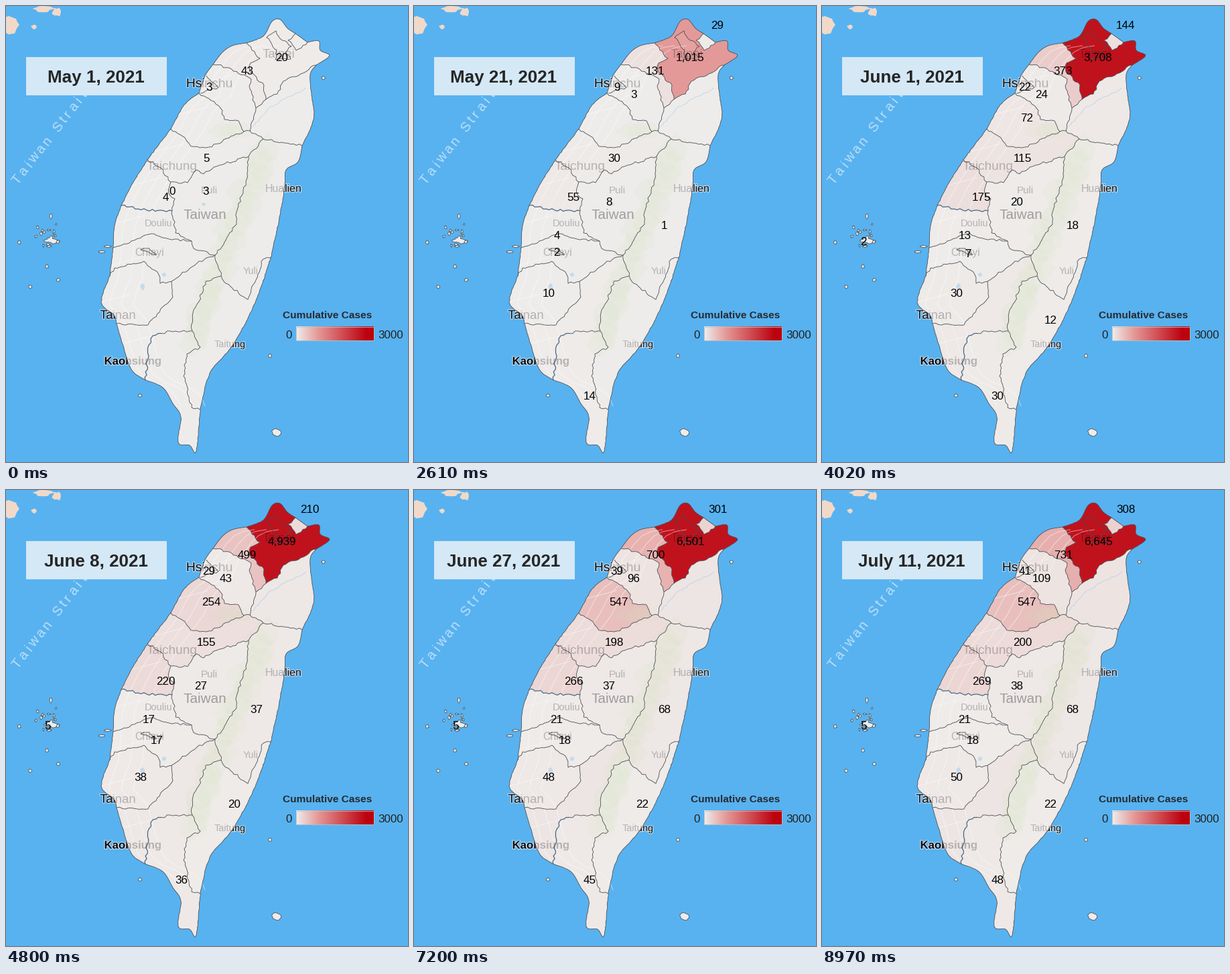
A matplotlib script for the animation above (9 s loop, 600x679 px).

```python
import random
import numpy as np
import matplotlib.pyplot as plt
from matplotlib.animation import FuncAnimation
from matplotlib.collections import LineCollection, PolyCollection
from matplotlib.colors import LinearSegmentedColormap
from matplotlib.patches import Rectangle
from matplotlib.patheffects import withStroke

W, H, DPI = 600, 679, 64
STEP, FRAMES = 30, 300
OUTBREAK, END = 1650, 9000
random.seed(7)

plt.rcParams["font.family"] = "Liberation Sans"
fig = plt.figure(figsize=(W / DPI, H / DPI), dpi=DPI, facecolor="#58b2f0")
ax = fig.add_axes([0, 0, 1, 1])
ax.axis("off")


def px(v):
    return v * 72 / DPI


def rgb(*c):
    return tuple(v / 255 for v in c)


def write(x, y, s, size, **kw):
    """Text centred on (x, y), judged by cap height."""
    return ax.text(x, y + 0.36 * size, s, fontsize=px(size), ha="center",
                   va="baseline", **kw)


def areas(polys, color, edge="none", **kw):
    coll = PolyCollection(polys, facecolors=[color], edgecolors=edge, **kw)
    ax.add_collection(coll)
    return coll


def lines(paths, color, width, **kw):
    ax.add_collection(LineCollection(paths, colors=[color], linewidths=px(width), **kw))


def smooth(pts, n=5):
    """Catmull-Rom curve through the points."""
    p = np.array([pts[0], *pts, pts[-1]], float)
    out = [p[1]]
    for a, b, c, d in zip(p, p[1:], p[2:], p[3:]):
        for u in np.linspace(0, 1, n + 1)[1:]:
            out.append(b + 0.5 * u * (c - a + u * (2 * a - 5 * b + 4 * c - d
                                                   + u * (3 * (b - c) + d - a))))
    return [tuple(q) for q in out]


def rough(pts, amp, step=4):
    """Polyline with small sideways wiggles between its points."""
    out = [pts[0]]
    for (x0, y0), (x1, y1) in zip(pts, pts[1:]):
        d = np.hypot(x1 - x0, y1 - y0)
        n = max(1, int(d / step))
        for k in range(1, n):
            a, f = random.uniform(-amp, amp), k / n
            out.append((x0 + (x1 - x0) * f - (y1 - y0) / d * a,
                        y0 + (y1 - y0) * f + (x1 - x0) / d * a))
        out.append((x1, y1))
    return out


def blob(x, y, w, h, n=12, jag=0.4):
    return [(x + w * np.cos(a) * random.uniform(1 - jag, 1),
             y + h * np.sin(a) * random.uniform(1 - jag, 1))
            for a in np.linspace(0, 2 * np.pi, n, endpoint=False)]


arcs = {}


def coast(name, *pts):
    arcs[name] = rough(smooth(pts), 0.6, 3)


def border(name, *pts):
    arcs[name] = rough(pts, 1.7)


# Coast, from the north tip round the west and back up the east
coast("ntp_w", (359, 55), (384, 45), (397, 23), (409, 20), (420, 33), (432, 41))
coast("kee", (432, 41), (450, 54))
coast("ntp_e", (450, 54), (467, 52), (469, 66), (483, 74), (463, 88))
coast("tao", (359, 55), (338, 59), (323, 69), (309, 87))
coast("hsi", (309, 87), (297, 104), (288, 130))
coast("mia", (288, 130), (266, 147), (246, 183))
coast("tai", (246, 183), (211, 229))
coast("cha", (211, 229), (189, 264), (172, 297))
coast("yun", (172, 297), (162, 327), (160, 360))
coast("chi", (160, 360), (155, 402))
coast("tnn", (155, 402), (142, 441), (161, 460), (165, 473))
coast("kao", (165, 473), (174, 503), (187, 541), (208, 557))
coast("pin", (208, 557), (234, 568), (249, 592), (261, 612), (257, 650), (274, 654),
      (284, 663), (290, 601))
coast("ttt", (290, 601), (304, 547), (337, 507), (372, 442), (395, 375))
coast("hua", (395, 375), (407, 322), (416, 268), (418, 244), (436, 232), (442, 208))
coast("yil", (442, 208), (459, 169), (456, 133), (454, 102), (463, 88))

# Borders between counties
border("kee_ntp", (432, 41), (421, 51), (433, 66), (450, 54))
border("ntp_yil", (463, 88), (440, 101), (414, 112), (405, 131), (388, 139))
border("ntp_tao", (359, 55), (379, 78), (365, 85), (364, 98), (385, 118), (388, 139))
border("tao_hsi", (309, 87), (333, 92), (366, 109), (363, 119), (373, 152))
border("tao_yil", (373, 152), (388, 139))
border("hsi_mia", (288, 130), (303, 138), (320, 152), (326, 169), (347, 171), (355, 187))
border("hsi_tai", (355, 187), (364, 186))
border("hsi_yil", (364, 186), (373, 152))
border("mia_tai", (246, 183), (267, 196), (276, 209), (303, 210), (355, 187))
border("tai_cha", (211, 229), (231, 241), (246, 262))
border("tai_nan", (246, 262), (271, 263), (284, 244), (295, 250), (319, 237), (362, 224))
border("tai_hua", (362, 224), (384, 198))
border("tai_yil", (384, 198), (364, 186))
border("cha_yun", (172, 297), (210, 304), (248, 305))
border("cha_nan", (248, 305), (252, 287), (243, 279), (246, 262))
border("nan_hua", (362, 224), (358, 262), (344, 307), (344, 325), (312, 371))
border("nan_chi", (312, 371), (280, 361), (277, 350))
border("nan_yun", (277, 350), (253, 338), (248, 305))
border("yun_chi", (160, 360), (184, 353), (217, 339), (240, 346), (277, 350))
border("chi_tnn", (155, 402), (162, 390), (206, 380), (228, 400), (230, 413), (247, 410))
border("chi_kao", (247, 410), (285, 383), (312, 371))
border("tnn_kao", (165, 473), (212, 475), (249, 433), (247, 410))
border("kao_pin", (208, 557), (213, 505), (219, 491), (245, 484), (278, 484))
border("kao_ttt", (278, 484), (279, 457), (288, 440), (298, 410), (321, 402))
border("kao_hua", (321, 402), (312, 371))
border("pin_ttt", (290, 601), (277, 598), (265, 551), (270, 518), (290, 508), (278, 484))
border("hua_yil", (442, 208), (412, 203), (384, 198))
border("ttt_hua", (395, 375), (384, 377), (361, 437), (328, 413), (321, 402))
border("tpe", (389, 47), (403, 37), (412, 51), (426, 60), (417, 69), (425, 79),
       (402, 80), (404, 66), (389, 47))
border("hsi_city", (299, 104), (317, 121), (290, 130))
border("chi_city", (201, 363), (213, 361), (225, 370), (201, 363))

counties = {}


def county(name, ring, first, base, last, tau, k, label=None):
    """Cases go first -> base before the outbreak, then an S-curve up to last."""
    pts = []
    for arc in ring.split():
        pts += arcs[arc[1:]][::-1] if arc[0] == "-" else arcs[arc]
    counties[name] = pts, (first, base, last, tau, k), label


county("New Taipei", "ntp_w kee_ntp ntp_e ntp_yil -ntp_tao",
       20, 45, 6645, 2.67, 1.8, (412, 76))
county("Taipei", "tpe", 12, 25, 4700, 2.3, 1.8)
county("Keelung", "kee -kee_ntp", 0, 2, 308, 2.97, 2.1, (453, 28))
county("Taoyuan", "ntp_tao -tao_yil -tao_hsi -tao", 43, 50, 731, 3.05, 1.8, (360, 96))
county("Hsinchu", "hsi hsi_mia hsi_tai hsi_yil -tao_hsi", 0, 0, 109, 4.2, 2.5, (328, 131))
county("Hsinchu City", "hsi_city", 3, 3, 41, 2.95, 1.6, (303, 120))
county("Miaoli", "mia mia_tai -hsi_mia", 0, 0, 547, 3.45, 5.2, (306, 166))
county("Taichung", "tai tai_cha tai_nan tai_hua tai_yil -hsi_tai -mia_tai",
       5, 5, 200, 2.6, 2, (299, 226))
county("Changhua", "cha cha_yun cha_nan -tai_cha", 4, 4, 269, 2.33, 1.75, (238, 284))
county("Nantou", "tai_nan nan_hua nan_chi nan_yun cha_nan", 3, 3, 38, 2.95, 1.75)
county("Yunlin", "yun yun_chi nan_yun -cha_yun", 0, 0, 21, 2.35, 1.8)
county("Chiayi", "chi chi_tnn chi_kao nan_chi -yun_chi", 2, 2, 18, 2.7, 7)
county("Tainan", "tnn tnn_kao -chi_tnn", 0, 0, 50, 2.55, 1.5, (201, 427))
county("Kaohsiung", "kao kao_pin kao_ttt kao_hua -chi_kao -tnn_kao", 6, 8, 90, 2.9, 1.8)
county("Pingtung", "pin pin_ttt -kao_pin", 0, 0, 48, 2.55, 1.1, (262, 580))
county("Taitung", "ttt ttt_hua -kao_ttt -pin_ttt", 0, 0, 22, 2.5, 4, (341, 467))
county("Hualien", "hua hua_yil -tai_hua nan_hua -kao_hua -ttt_hua",
       0, 0, 68, 3.4, 3.3, (374, 326))
county("Yilan", "yil ntp_yil -tao_yil -hsi_yil -tai_yil -hua_yil", 0, 1, 95, 3.2, 1.8)
county("Penghu", "", 0, 0, 5, 2.5, 7)

# Labels that fly in: county, start, end, resting place, offset at the start
flights = [
    ("Nantou", 0, 240, 298, 275, 0, 0),
    ("Nantou", 1860, END, 291, 291, 0, 0),
    ("Yunlin", 0, 120, 248, 275, 0, 0),
    ("Yunlin", 1560, END, 213, 341, -47, -23),
    ("Chiayi", 1560, 3900, 213, 366, 66, -37),
    ("Chiayi", 3900, END, 225, 372, -12, -6),
    ("Chiayi", 3210, 3480, 246, 94, -97, -60),
    ("Penghu", 3210, END, 62, 350, -40, -29),
]
FLY = 300


def count(name, t):
    first, base, last, tau, k = counties[name][1]
    if t <= OUTBREAK:
        return first + (base - first) * t / OUTBREAK

    def rise(ms):
        return 1 - np.exp(-((ms - OUTBREAK) / 1000 / tau) ** k)
    return base + (last - base) * rise(t) / rise(END - STEP)


PAPER = rgb(238, 236, 234)
reds = LinearSegmentedColormap.from_list(
    "reds", [(0, PAPER), (0.3, rgb(228, 155, 153)), (1, rgb(188, 2, 14))])


def shade(v):
    c = np.array(reds(min(v / 3000, 1.0))[:3])
    return 0.93 * c + 0.07 * np.array(PAPER)


def date(t):
    d = int(max(0, (t - 100) / 123.5))
    for month, days in (("May", 31), ("June", 30), ("July", 31)):
        if d < days:
            return f"{month} {d + 1}, 2021"
        d -= days


# Far coast and small islands
areas([blob(4, 28, 23, 15), blob(42, 31, 5, 4), blob(56, 4, 17, 6), blob(76, 9, 9, 8)],
      rgb(240, 217, 200), linewidths=0.6)
isles = [blob(random.gauss(65, 9), random.gauss(342, 11), random.uniform(1.5, 5),
              random.uniform(1.5, 4), 9, 0.7) for _ in range(16)]
isles += [blob(67, 349, 12, 7, 16, 0.7), blob(67, 313, 2, 5)]
isles += [blob(x, y, 3, 3) for x, y in (
    (20, 352), (61, 388), (36, 418), (78, 408), (200, 580), (474, 107), (394, 521))]
isles += [blob(404, 635, 9, 7, 12, 0.5), blob(152, 358, 6, 2), blob(143, 366, 6, 2)]
areas(isles, PAPER, [rgb(75, 80, 85)], linewidths=px(0.8))

strait = "Taiwan Strait"
adv = [0.7 if c in "itr " else 1 for c in strait]
for c, f in zip(strait, (np.cumsum(adv) - np.array(adv) / 2) / sum(adv)):
    ax.text(12 + 107 * f, 265 - 138 * f, c, fontsize=px(20), rotation=52, ha="center",
            va="center", color=rgb(188, 223, 249))

# Place names: dark out at sea, pale where the land covers them
places = [
    ("Taipei", 407, 70, 18.7), ("Hsinchu", 304, 114, 19.4), ("Taichung", 248, 237, 19),
    ("Puli", 303.5, 274, 15), ("Hualien", 414, 271, 15.9), ("Douliu", 228, 323, 14.5),
    ("Chiayi", 214, 366, 15.8), ("Yuli", 365, 394, 14), ("Tainan", 167.5, 459, 18.6),
    ("Taitung", 334, 503, 14.4), ("Kaohsiung", 189.5, 528, 16.8),
    ("Taiwan", 297, 310, 20.8)]
inland = {"Taipei", "Puli", "Douliu", "Chiayi", "Yuli", "Taiwan"}
for name, x, y, size in places:
    weight = "bold" if name == "Kaohsiung" else "normal"
    if name not in inland:
        write(x, y, name, size, weight=weight, color="#111111", zorder=1,
              path_effects=[withStroke(linewidth=px(2), foreground="#d9ecfa")])
    write(x, y, name, size, weight=weight, color="#0c0614", zorder=4,
          alpha=0.34 if name == "Taiwan" else 0.25)

# Land with woods along the mountain spine and roads that follow the west coast
shapes = {n: pts for n, (pts, _, _) in counties.items() if pts}
land = areas(list(shapes.values()), PAPER, zorder=2)

woods = [blob(np.interp(y, [205, 350, 490], [392, 330, 290]) + random.gauss(0, 5), y,
              24, 26, 16) for y in np.linspace(212, 500, 22)]
woods += [blob(x, 185, 22, 15, 16) for x in (322, 336, 350)]
areas(woods, rgb(214, 228, 190), alpha=0.13, zorder=3)
areas([blob(295, 295, 4, 3), blob(204, 418, 4, 6), blob(236, 400, 4, 4)],
      rgb(188, 215, 236), alpha=0.8, zorder=3)

west = [p for n in "tao hsi mia tai cha yun chi tnn kao pin".split() for p in arcs[n][::4]]
roads = [rough([(x + dx, y + 4) for x, y in west if y < 600], 2, 9) for dx in (12, 30, 48)]
roads += [[(x, y), (x + 45, y - 12)] for x, y in west[6:-14:5]]
lines(roads, "white", 1.3, alpha=0.4, zorder=3)
lines([arcs["cha_yun"], arcs["kao_pin"][:20]], rgb(140, 185, 228), 1.8, alpha=0.7, zorder=3)
lines([rough([(448, 122), (395, 150), (368, 180)], 1.5)], rgb(150, 195, 235), 1.2,
      alpha=0.4, zorder=3)
lines(list(arcs.values()), rgb(75, 75, 78), 0.8, zorder=5)

# Date box and legend
ax.add_patch(Rectangle((29.5, 76), 210.5, 56.5, fc="#d5e8f6", lw=0, zorder=6))
title = write(134, 105, "", 26, weight="bold", color="#262626", zorder=7)
write(479.5, 459, "Cumulative Cases", 15.4, weight="bold", color="#262a30")
write(422, 489, "0", 17, color="#222222")
write(574, 489, "3000", 17, color="#222222")
ax.imshow(np.linspace(0, 1.1, 116)[None, :], cmap=reds, vmin=0, vmax=1, aspect="auto",
          extent=(432.5, 548.5, 498, 477), zorder=6)
ax.add_patch(Rectangle((432.5, 477.5), 116, 20, fill=False, ec=rgb(185, 195, 203),
                       lw=px(0.8), zorder=7))
ax.set_xlim(0, W)
ax.set_ylim(H, 0)

fixed = {n: xy for n, (_, _, xy) in counties.items() if xy}
steady = {n: write(*xy, "", 17, zorder=8) for n, xy in fixed.items()}
flying = [write(0, 0, "", 17, zorder=8) for _ in flights]


def update(i):
    t = i * STEP
    now = {n: count(n, t) for n in counties}
    title.set_text(date(t))
    land.set_facecolor([shade(now[n]) for n in shapes])
    for name, mark in steady.items():
        mark.set_visible(now[name] >= 1)
        mark.set_text(f"{now[name]:,.0f}")
    for mark, (name, start, end, x, y, dx, dy) in zip(flying, flights):
        left = max(0, 1 - (t - start) / FLY)
        mark.set_visible(start <= t < end)
        mark.set_position((x + dx * left, y + dy * left + 6))
        mark.set_text(f"{now[name]:,.0f}")
    return [title, land, *steady.values(), *flying]


anim = FuncAnimation(fig, update, frames=FRAMES, interval=STEP, repeat=True,
                     repeat_delay=0, blit=False)
plt.show()
```
